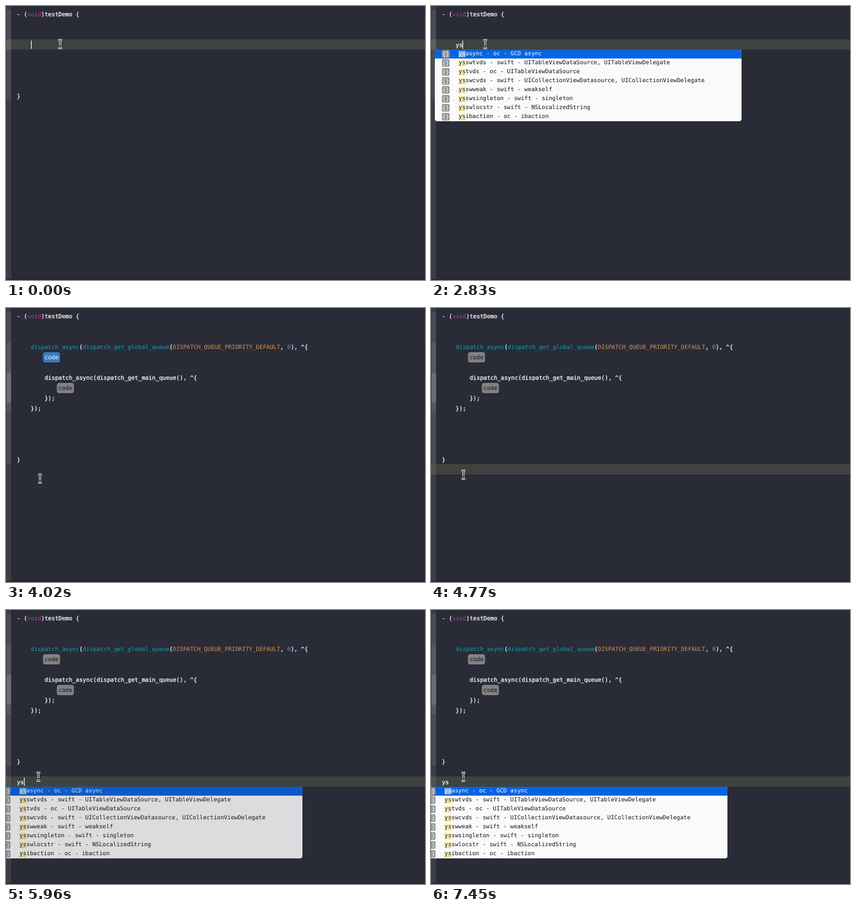
Write an HTML page that moves like this. It is 653x428 px and loops after 8 s.

```html
<!DOCTYPE html>
<html lang="en">
<head>
<meta charset="utf-8">
<title>Code snippets</title>
<style>
  html, body { margin: 0; width: 100%; height: 100%; overflow: hidden; background: #292b36; }
  svg { display: block; }
  text { font: 8.97px "DejaVu Sans Mono", monospace; text-rendering: geometricPrecision; white-space: pre; }
  .code { fill: #fff; stroke: #fff; stroke-width: .25px; }
  .code tspan { stroke: none; }
</style>
</head>
<body>
<svg id="stage" width="653" height="428" viewBox="0 0 653 428"></svg>
<script>
const LOOP = 8000, CHAR = 5.4, LEFT = 17, ROW = 16;
const PINK = '#c9349c', CYAN = '#12a3b8', ORANGE = '#d4935c', PURPLE = '#8f80dc';
const colX = col => LEFT + col * CHAR;
const rowY = row => 4 + row * ROW;

// Each step: time, then the values that hold until the next step
const carets = [
  [0, 4, 3], [300], [450, 5, 3], [590, 6, 3], [1190], [1640, 6, 3], [2230], [2830, 6, 3],
  [3120], [4170, 0, 15], [4770], [4920, 0, 16], [5520], [5670, 1, 16], [5820, 2, 16],
  [6410], [7000, 2, 16], [7450]
];
const pointers = [
  [0, 84, 59], [3570, 89.5, 140], [3720, 66, 237.5], [3870, 57, 278], [4020, 52.5, 266], [4170, 50, 260]
];
const activeRows = [[0, 3], [3120], [4170, 15], [4920, 16]];
const typed = [[0, ''], [450, 'y'], [590, 'ys'], [3120, ''], [5670, 'y'], [5820, 'ys']];

const at = (steps, t) => steps.findLast(step => step[0] <= t).slice(1);

const rect = (x, y, w, h, fill, r = 0) =>
  `<rect x="${x}" y="${y}" width="${w}" height="${h}" rx="${r}" fill="${fill}"/>`;
const text = (x, y, str, fill) => `<text x="${x}" y="${y}" fill="${fill}">${str}</text>`;
const code = (col, row, str) => `<text class="code" x="${colX(col)}" y="${rowY(row) + 12}">${str}</text>`;
const tint = (str, fill) => `<tspan fill="${fill}">${str}</tspan>`;

function placeholder(col, row, selected) {
  return rect(colX(col) - 2.5, rowY(row) + 1, 26.5, 16, selected ? '#377bc4' : '#828285', 3.5) +
    text(colX(col), rowY(row) + 12, 'code', selected ? '#fff' : '#111');
}

function snippet(colored, selected) {
  const paint = (str, fill) => colored ? tint(str, fill) : str;
  return code(4, 3, paint('dispatch_async', CYAN) + '(' + paint('dispatch_get_global_queue', CYAN) + '(' +
      paint('DISPATCH_QUEUE_PRIORITY_DEFAULT', ORANGE) + ', ' + tint('0', PURPLE) + '), ^{') +
    placeholder(8, 4, selected) +
    code(8, 6, 'dispatch_async(dispatch_get_main_queue(), ^{') +
    placeholder(12, 7, false) +
    code(8, 8, '});') + code(4, 9, '});');
}

const completions = [
  'ysasync - oc - GCD async',
  'ysswtvds - swift - UITableViewDataSource, UITableViewDelegate',
  'ystvds - oc - UITableViewDataSource',
  'ysswcvds - swift - UICollectionViewDatasource, UICollectionViewDelegate',
  'ysswweak - swift - weakself',
  'ysswsingleton - swift - singleton',
  'ysswlocstr - swift - NSLocalizedString',
  'ysibaction - oc - ibaction'
];

function popup(x, y, opacity = 1) {
  const items = completions.map((str, i) => {
    const top = i * 14, active = i === 0;
    return rect(11, top + 1, 12, 12, '#979797', 2) +
      text(11.6, top + 9.6, '{}', '#fff') +
      rect(37, top + 2, 10.8, 9, active ? '#7fa9e8' : '#fdf3bd') +
      rect(37, top + 10.5, 10.8, 1, active ? '#d9e5f8' : '#e3bd25') +
      text(37, top + 9, str, active ? '#fff' : '#151515');
  }).join('');
  return `<g transform="translate(${x} ${y})" opacity="${opacity}">` +
    rect(0, 0, 478, 112, '#fafafa', 4) +
    '<path d="M0 14V4Q0 0 4 0H474Q478 0 478 4V14Z" fill="#0664e1"/>' + items + '</g>';
}

function pointer(x, y) {
  const beam = 'M-3 -6.5Q0 -6.5 0 -4.5Q0 -6.5 3 -6.5M0 -4.5V4.5M-3 6.5Q0 6.5 0 4.5Q0 6.5 3 6.5M-1.5 3H1.5';
  const stroke = (color, width) => `<path d="${beam}" fill="none" stroke="${color}" stroke-width="${width}"/>`;
  return `<g transform="translate(${x + .5} ${y + .5})">${stroke('#fff', 2.8)}${stroke('#000', 1)}</g>`;
}

function scene(t) {
  const expanded = t >= 3120;
  const [activeRow] = at(activeRows, t);
  const [caretCol, caretRow] = at(carets, t);
  const [word] = at(typed, t);
  const ribbon = (y, h, alpha) => rect(1, y, 7, h, `rgba(255,255,255,${alpha})`, 2);

  let out = rect(0, 0, 653, 428, '#292b36');
  if (activeRow !== undefined) out += rect(0, rowY(activeRow), 653, ROW, '#40423f');
  out += rect(0, 0, 8, 428, 'rgba(255,255,255,.085)') + ribbon(6, expanded ? 237 : 141, .08);
  if (expanded) out += ribbon(54, 109, .07) + ribbon(101, 47, .13);
  out += rect(0, 426.5, 653, 1.5, '#25242d');

  out += code(0, 0, '- (' + tint('void', PINK) + ')testDemo {') + code(0, expanded ? 14 : 8, '}');
  if (expanded) out += snippet(t >= 3720, t < 4170);
  if (word) out += code(expanded ? 0 : 4, expanded ? 16 : 3, word);
  if (caretRow !== undefined) out += rect(Math.round(colX(caretCol)), rowY(caretRow) + 2, 1, 13, '#fff');

  if (t >= 890 && !expanded) out += popup(6, 68);
  if (t >= 5960) out += popup(-16, 276, t < 6110 ? .86 : 1);
  return out + pointer(...at(pointers, t));
}

const stage = document.getElementById('stage');
const start = performance.now();
let shown = '';
function draw() {
  const next = scene((performance.now() - start) % LOOP);
  if (next !== shown) stage.innerHTML = shown = next;
  requestAnimationFrame(draw);
}
draw();
</script>
</body>
</html>
```
